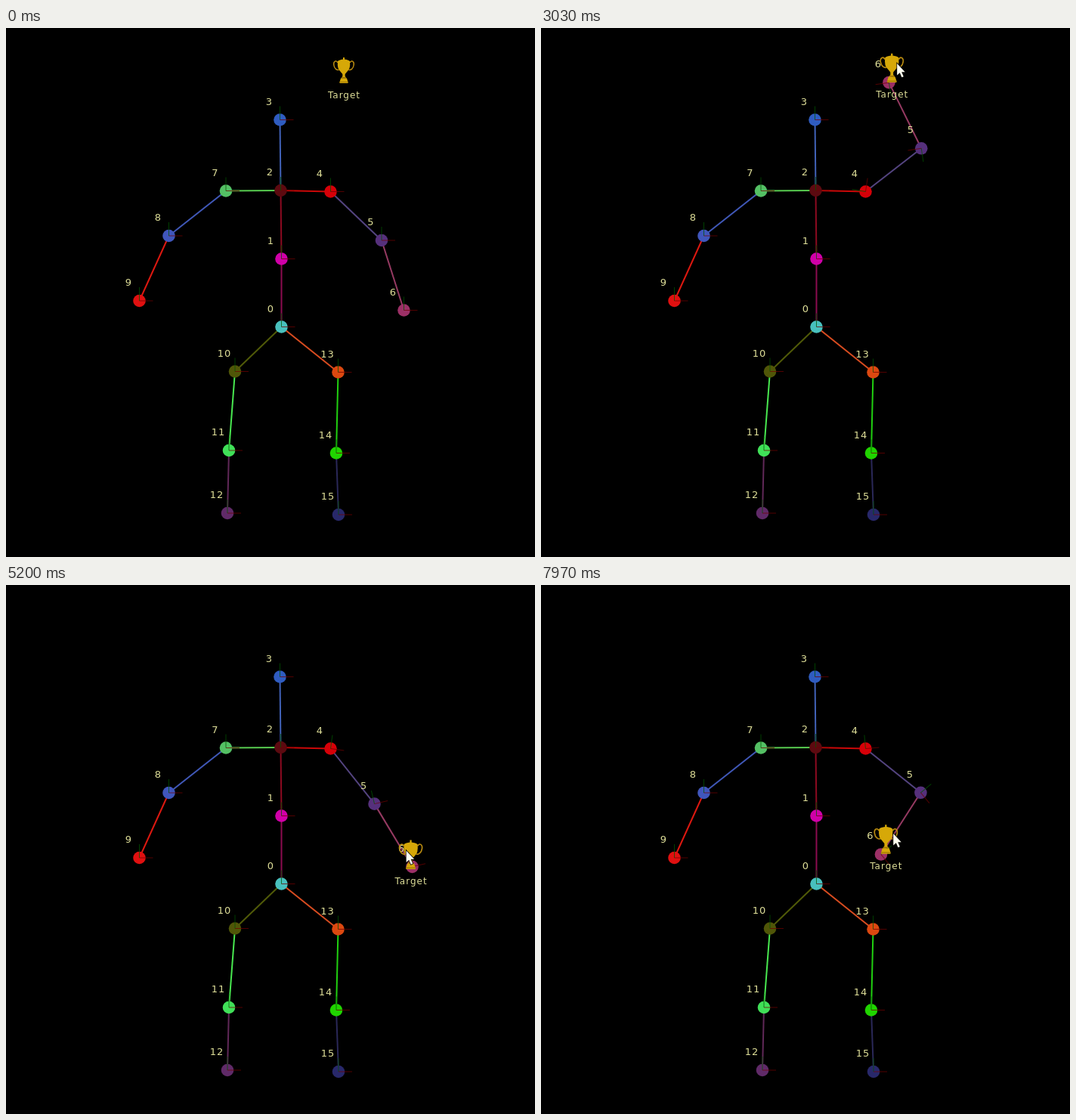
An HTML page with a canvas for the animation above (8000 ms loop, 700 px wide and 700 px high).

```html
<!DOCTYPE html>
<html lang="en">
<head>
<meta charset="utf-8">
<title>Skeleton reaching for a target</title>
<style>
  html, body { margin: 0; height: 100%; overflow: hidden; background: #000; }
  canvas { display: block; width: 100vw; height: 100vh; }
</style>
</head>
<body>
<canvas id="stage" width="700" height="700"></canvas>
<script>
const ctx = document.getElementById('stage').getContext('2d');
const LOOP = 8000, HOVER = 1690, GRAB = 1850;
const SHOULDER = 4, ELBOW = 5, HAND = 6;

// x, y, parent, joint colour, bone colour
const joints = [
  [364.5, 395.5, -1, '#48c0bd'],
  [364.5, 305.5, 0, '#d000a8', '#8c0c50'],
  [363.5, 215, 1, '#5c0a10', '#8c0a20'],
  [362.5, 121.5, 2, '#2f5cc0', '#4162b8'],
  [429.5, 216.5, 2, '#d60008', '#cc0808'],
  [497, 281, 4, '#56307c', '#544480'],
  [526.5, 373.5, 5, '#9c3066', '#963a62'],
  [291, 215.5, 2, '#54c064', '#58cc50'],
  [215.5, 275, 7, '#4056bc', '#4058b8'],
  [176.5, 361, 8, '#e01010', '#dc1810'],
  [303, 454.5, 0, '#505608', '#505a08'],
  [295, 559, 10, '#40e058', '#48e850'],
  [293, 642, 11, '#602a68', '#602858'],
  [439.5, 455.5, 0, '#dc4810', '#d84c20'],
  [437, 562.5, 13, '#20d400', '#20d010'],
  [440, 644, 14, '#28286a', '#2a2858']
].map(([x, y, parent, color, bone]) => ({ x, y, parent, color, bone }));

// Mouse path: ms, x, y and, where it matters, speed in px per second
const path = [
  [0, 760, 330, 0, 0], [450, 712, 306], [830, 588, 214], [1130, 549, 170],
  [1660, 450, 45], [1760, 447, 48, 0, 0], [2750, 447, 48, 0, 0],
  [3030, 471, 47, 190, 0], [3370, 522, 62], [3800, 580, 120],
  [4170, 606, 193], [4530, 610, 273, -15, 225], [4750, 598, 318],
  [4970, 564, 345], [5400, 499, 352], [5870, 418, 345, -175, 0],
  [6200, 368, 328], [6480, 362, 312], [6740, 385, 318],
  [6970, 394, 274, 20, -225], [7180, 390, 246], [7460, 383, 278],
  [7700, 407, 325], [7970, 466, 329, 250, -50], [8000, 473, 327]
];

function slope(i, axis) {
  if (path[i].length > 3) return path[i][axis + 2] / 1000;
  const a = path[Math.max(i - 1, 0)], b = path[Math.min(i + 1, path.length - 1)];
  return (b[axis] - a[axis]) / (b[0] - a[0]);
}

function mouseAt(t) {
  let i = 0;
  while (i < path.length - 2 && path[i + 1][0] <= t) i++;
  const a = path[i], b = path[i + 1], span = b[0] - a[0];
  const u = Math.max(0, (t - a[0]) / span), u2 = u * u, u3 = u2 * u;
  const along = axis => a[axis] * (2 * u3 - 3 * u2 + 1) + b[axis] * (3 * u2 - 2 * u3)
    + span * (slope(i, axis) * (u3 - 2 * u2 + u) + slope(i + 1, axis) * (u3 - u2));
  return { x: along(1), y: along(2) };
}

const angle = (a, b) => Math.atan2(b.y - a.y, b.x - a.x);
const length = (a, b) => Math.hypot(b.x - a.x, b.y - a.y);
const UPPER = length(joints[SHOULDER], joints[ELBOW]);
const LOWER = length(joints[ELBOW], joints[HAND]);

// Two-bone arm; it swaps its bend while fully stretched
function poseAt(t) {
  const pose = joints.map(j => ({ ...j, turn: 0 }));
  if (t < GRAB) return pose;
  const [shoulder, elbow, hand] = pose.slice(SHOULDER, HAND + 1);
  const mouse = mouseAt(t - 66);
  const goal = { x: mouse.x, y: mouse.y + 25 };
  const reach = Math.min(length(shoulder, goal), UPPER + LOWER - 0.4);
  const dir = angle(shoulder, goal);
  const bend = Math.max(-1, Math.min(1, (4750 - t) / 120));
  const along = (reach ** 2 + UPPER ** 2 - LOWER ** 2) / (2 * reach);
  const side = bend * Math.sqrt(Math.max(0, UPPER ** 2 - along ** 2));
  const cos = Math.cos(dir), sin = Math.sin(dir);
  elbow.x = shoulder.x + along * cos - side * sin;
  elbow.y = shoulder.y + along * sin + side * cos;
  hand.x = shoulder.x + reach * cos;
  hand.y = shoulder.y + reach * sin;
  shoulder.turn = angle(shoulder, elbow) - angle(joints[SHOULDER], joints[ELBOW]);
  elbow.turn = hand.turn = angle(elbow, hand) - angle(joints[ELBOW], joints[HAND]);
  return pose;
}

function line(x1, y1, x2, y2, color, width) {
  ctx.strokeStyle = color;
  ctx.lineWidth = width;
  ctx.beginPath();
  ctx.moveTo(x1, y1);
  ctx.lineTo(x2, y2);
  ctx.stroke();
}

function text(label, x, y, size) {
  ctx.font = `${size}px "DejaVu Sans", sans-serif`;
  ctx.letterSpacing = '1px';
  ctx.textAlign = 'center';
  ctx.textBaseline = 'alphabetic';
  ctx.fillStyle = '#dede98';
  ctx.fillText(label, x + 0.5, y);
}

function drawJoint({ x, y, color, turn }) {
  ctx.save();
  ctx.translate(x, y);
  ctx.fillStyle = color;
  ctx.beginPath();
  ctx.arc(0, 0, 8.3, 0, 7);
  ctx.fill();
  ctx.rotate(turn);
  line(0, 0, 18, 0, 'rgba(110,0,0,.75)', 1);
  line(0, 0, 0, -18, 'rgba(0,85,0,.75)', 1);
  ctx.restore();
}

// Origin at the middle of the base
function drawTrophy(x, y, scale) {
  ctx.save();
  ctx.translate(x, y);
  ctx.scale(scale, scale);
  ctx.strokeStyle = '#b88a10';
  ctx.lineWidth = 1.5;
  for (const s of [-1, 1]) {
    ctx.beginPath();
    ctx.moveTo(s * 8, -27);
    ctx.bezierCurveTo(s * 10, -31, s * 14, -29, s * 13.2, -24);
    ctx.bezierCurveTo(s * 12.5, -19, s * 9, -17, s * 6.5, -17.5);
    ctx.stroke();
  }
  ctx.fillStyle = '#d6a808';
  ctx.fill(new Path2D('M-1-34h2v2.5q5 .5 7 2.5q1 10-3 13l-3.3 4v3l2 2.5h-7.4l2-2.5v-3l-3.3-4q-4-3-3-13q2-2 7-2.5z'));
  ctx.fill(new Path2D('M-4-6.5h8l1.5 5v1.5h-11v-1.5z'));
  ctx.fillStyle = '#9c7406';
  ctx.fillRect(-3, -8, 6, 1.2);
  ctx.fillRect(-5.5, -2, 11, 1);
  ctx.restore();
}

const arrow = new Path2D('M0 0V15.5L3.6 12.2L6.2 18.2L8.6 17.2L6 11.3H10.5Z');

function drawCursor({ x, y }) {
  ctx.save();
  ctx.translate(x, y);
  ctx.strokeStyle = '#000';
  ctx.lineWidth = 1.5;
  ctx.stroke(arrow);
  ctx.fillStyle = '#fffff0';
  ctx.fill(arrow);
  ctx.restore();
}

function draw(t) {
  ctx.fillStyle = '#000';
  ctx.fillRect(0, 0, 700, 700);

  const pose = poseAt(t);
  for (const j of pose) {
    const p = pose[j.parent];
    if (p) line(p.x, p.y, j.x, j.y, j.bone, 2);
  }
  pose.forEach(drawJoint);
  pose.forEach((j, i) => text(i, j.x - 14.5, j.y - 20, 13));

  const held = t < GRAB ? { x: 447, y: 48 } : mouseAt(t - 40);
  drawTrophy(held.x, held.y + 25, t < HOVER ? 1 : 1.13);
  text('Target', held.x, held.y + 45, 12);
  drawCursor(mouseAt(t));
}

function frame(now) {
  draw(now % LOOP);
  requestAnimationFrame(frame);
}
requestAnimationFrame(frame);
</script>
</body>
</html>
```
